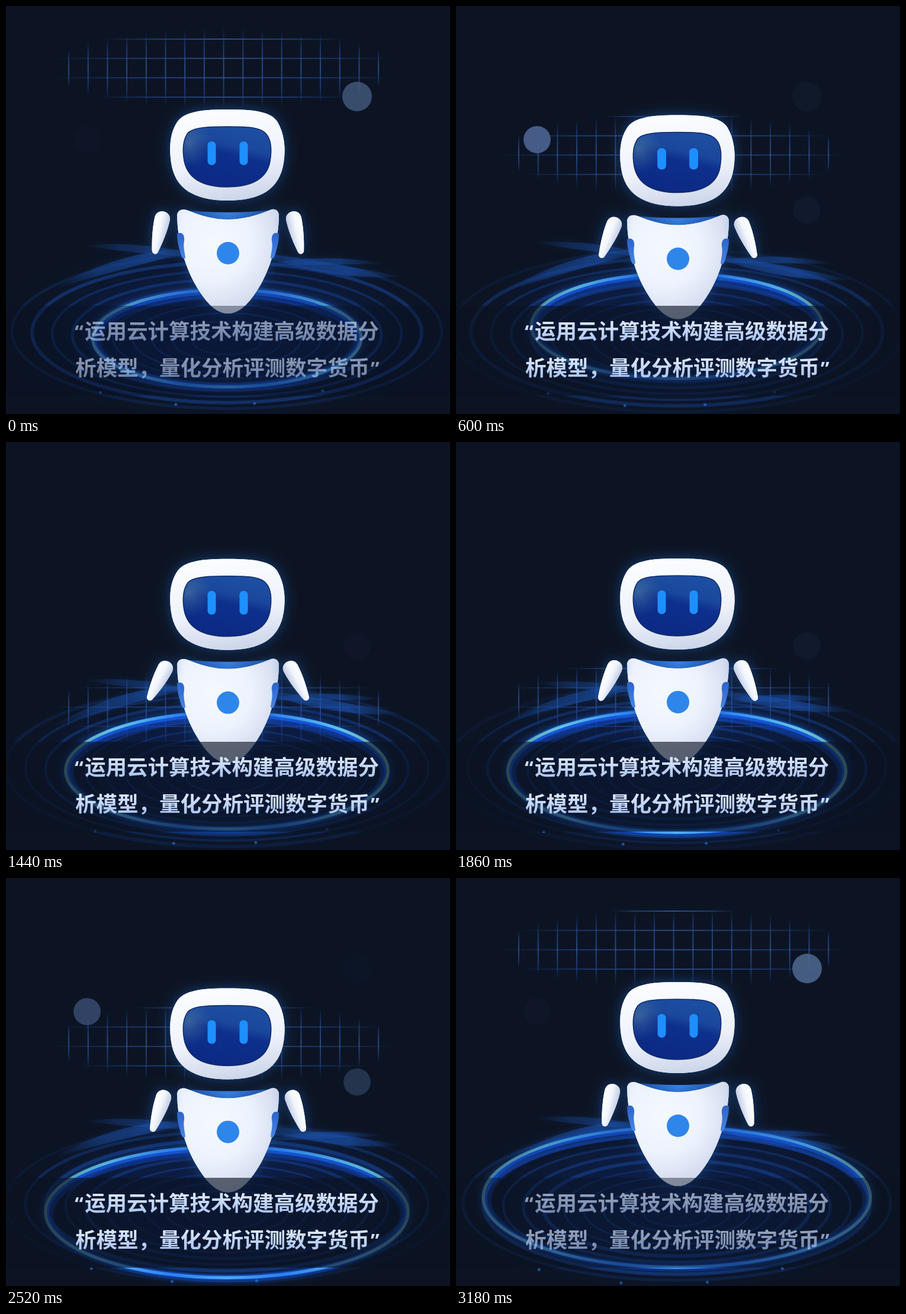
Recreate the animation shown at these times as an HTML page with a canvas. Size 750 by 690 pixels, loop 3.24 s.

```html
<!DOCTYPE html>
<html lang="zh-CN">
<head>
<meta charset="utf-8">
<style>
html, body { margin: 0; width: 100%; height: 100%; overflow: hidden; background: #0c1424; }
canvas { display: block; }
</style>
</head>
<body>
<canvas id="stage" width="750" height="690"></canvas>
<script>
const c = document.getElementById('stage').getContext('2d');
const LOOP = 3240, STEP = 60, CELL = 32.7;
const clamp = v => Math.max(0, Math.min(1, v));
const rise = (t, peak) => t < peak ? t / peak : (LOOP - t) / (LOOP - peak);

// Linear interpolation through [time, value] pairs
function track(keys, t) {
  const i = keys.findIndex(k => k[0] > t);
  const [t0, v0] = keys[i - 1], [t1, v1] = keys[i];
  return v0 + (v1 - v0) * (t - t0) / (t1 - t0);
}

function blend(grad, stops) {
  stops.forEach(([at, color]) => grad.addColorStop(at, color));
  return grad;
}
const linear = (x0, y0, x1, y1, ...stops) => blend(c.createLinearGradient(x0, y0, x1, y1), stops);
const radial = (x, y, r, ...stops) => blend(c.createRadialGradient(x, y, 0, x, y, r), stops);

function fill(path, style) {
  c.fillStyle = style;
  c.fill(path);
}

function disc(x, y, r, color) {
  c.fillStyle = color;
  c.beginPath();
  c.arc(x, y, r, 0, 7);
  c.fill();
}

function ring(cy, rx, ry, width, style) {
  c.lineWidth = width;
  c.strokeStyle = style;
  c.beginPath();
  c.ellipse(373, cy, rx, ry, 0, 0, 7);
  c.stroke();
}

// --- Scanning grid ---
function gridLine(x0, y0, x1, y1) {
  const edge = 'rgba(35,85,180,0)', mid = 'rgba(36,80,160,.6)';
  c.strokeStyle = linear(x0, y0, x1, y1, [0, edge], [.2, mid], [.5, 'rgba(58,98,168,.75)'], [.8, mid], [1, edge]);
  c.beginPath();
  c.moveTo(x0, y0);
  c.lineTo(x1, y1);
  c.stroke();
}

function grid(cy) {
  const rx = 292, ry = 69, cx = 367.5;
  c.lineWidth = 1.8;
  for (let k = 0; k < 17; k++) {
    const x = 106 + k * CELL, y = 56 + k * CELL;
    const h = ry * Math.sqrt(1 - ((x - cx) / rx) ** 2);
    gridLine(x, cy - h, x, cy + h);
    const d = (y - cy) / ry;
    if (Math.abs(d) < 1) {
      const w = rx * Math.sqrt(1 - d * d);
      gridLine(cx - w, y, cx + w, y);
    }
  }
}

function coin(x, y, r, color, scan) {
  c.globalAlpha = 1 / (1 + Math.exp((Math.abs(y - scan) - 58) / 14));
  disc(x, y, r, color);
  c.globalAlpha = 1;
}

// --- Water ---
function streak(x0, y0, x1, y1, bend, thick, alpha) {
  const mx = (x0 + x1) / 2, my = (y0 + y1) / 2 + bend;
  const rgb = a => `rgba(28,84,178,${a})`;
  c.fillStyle = linear(x0, 0, x1, 0, [0, rgb(0)], [.3, rgb(alpha * .7)], [.65, rgb(alpha)], [1, rgb(0)]);
  c.shadowColor = rgb(alpha);
  c.shadowBlur = 10;
  c.beginPath();
  c.moveTo(x0, y0);
  c.quadraticCurveTo(mx, my - thick, x1, y1);
  c.quadraticCurveTo(mx, my + thick, x0, y0);
  c.fill();
  c.shadowBlur = 0;
}

function water(t) {
  const grow = 102 * t / LOOP, sway = 6 * Math.sin(t / LOOP * 2 * Math.PI);

  c.save();
  c.translate(373, 545);
  c.scale(1, .42);
  c.fillStyle = radial(0, 0, 350, [0, 'rgba(12,44,130,.4)'], [.6, 'rgba(12,44,120,.3)'], [1, 'rgba(12,30,80,0)']);
  c.fillRect(-373, -380, 750, 760);
  c.restore();

  streak(80, 478 + sway, 330, 412, -22, 18, .5);
  streak(130, 405 - sway, 340, 425, -6, 13, .4);
  streak(410, 415, 670, 458 + sway, 12, 17, .55);
  streak(420, 440 - sway, 640, 436, -12, 11, .45);

  for (let j = -3; j < 13; j++) {
    const rx = 23 + 34 * j + grow;
    if (rx < 15 || rx > 400) continue;
    const fade = clamp((rx - 15) / 50) * clamp((400 - rx) / 70);
    const kind = (j + 3) % 3, wide = rx > 210;
    const a = fade * (wide ? .5 : .42) * (1 - kind * .15);
    ring(572 - .06 * rx, rx, rx * .36, wide ? 6 - kind : 3, `rgba(24,72,160,${a})`);
  }

  const rx = 227 + grow, ry = rx * .362;
  const cy = track([[0, 562], [600, 541], [1080, 555], [1860, 557], [2220, 554],
    [2760, 574], [3180, 540], [LOOP, 562]], t);
  c.globalAlpha = .65 + .35 * Math.sin(Math.PI * clamp(t / LOOP));
  ring(cy + 5, rx - 7, ry - 4, 13, 'rgba(16,68,200,.5)');
  ring(cy + 2, rx - 3, ry - 2, 7, 'rgba(24,92,235,.75)');
  c.shadowColor = '#1668e8';
  c.shadowBlur = 14;
  ring(cy, rx, ry, 5, linear(373 - rx, 0, 373 + rx, 0,
    [0, '#5f9fa0'], [.16, '#62c4e8'], [.35, '#2f86f5'], [.5, '#55b4f8'],
    [.65, '#2f86f5'], [.86, '#62c4e8'], [1, '#6aa69a']));
  c.shadowBlur = 0;
  c.globalAlpha = 1;

  for (let i = 0; i < 4; i++) {
    const a = 1 + i * .42, r = 300 + i * 12 + grow * .3;
    disc(373 + r * Math.cos(a), 555 + r * .38 * Math.sin(a), 2.5, 'rgba(40,120,220,.6)');
  }
}

// --- Robot ---
const headShape = new Path2D('M374 175C425 175 447 180 458 195C470 215 473 240 469 265C462 310 430 329 374 329C317 329 285 308 279 265C275 235 278 212 290 195C302 180 325 175 374 175Z');
const screenShape = new Path2D('M374 204C415 204 432 206 440 217C449 228 449 245 446 263C441 292 415 306 374 306C332 306 307 291 301 262C298 245 298 228 307 215C315 206 335 204 374 204Z');
const bodyShape = new Path2D('M289 356C288 347 296 342 305 345C330 355 350 361 375 361C400 361 425 354 446 345C455 341 462 347 461 357C460 390 452 430 432 468C415 498 397 520 375 520C353 520 335 498 318 468C298 430 290 390 289 356Z');
const neckShape = new Path2D('M298 345Q375 353 452 345Q420 366 375 366Q330 366 298 345Z');
const slotShape = new Path2D('M289 385C298 381 302 388 301 397C299 408 302 416 303 426C299 430 296 424 294 415C291 405 289 396 289 385Z');
const armShape = new Path2D('M-13 0C-13-17 13-17 13 0C13 22 8 45 5 57C3 62-3 62-5 57C-8 45-13 22-13 0Z');

function mirrored(draw) {
  for (const side of [1, -1]) {
    c.save();
    if (side < 0) {
      c.translate(750, 0);
      c.scale(-1, 1);
    }
    draw();
    c.restore();
  }
}

function glow(path) {
  c.shadowColor = 'rgba(24,78,150,.75)';
  c.shadowBlur = 20;
  fill(path, '#e8eefa');
  c.shadowBlur = 0;
}

function robot(t) {
  const swing = 17.8 * rise(t, 1134);
  const shut = Math.max(clamp(1 - Math.abs(t - 705) / 120), clamp(1 - Math.abs(t - 2190) / 120)) * .8;
  c.save();
  c.translate(0, 25.7 * rise(t, LOOP / 2));

  fill(neckShape, linear(298, 0, 452, 0, [0, '#1d4fae'], [.5, '#3c86ea'], [1, '#1d4fae']));
  glow(bodyShape);
  fill(bodyShape, radial(350, 400, 130, [0, '#f4f9ff'], [.5, '#edf3fd'], [1, '#ccd4ea']));
  mirrored(() => fill(slotShape, linear(289, 384, 302, 428, [0, '#2a62c8'], [1, '#4a86e6'])));
  disc(375, 418, 19, '#2f86ea');

  mirrored(() => {
    c.translate(264 + swing * .33, 360);
    c.rotate((12.5 + swing) * Math.PI / 180);
    glow(armShape);
    fill(armShape, linear(-13, 0, 13, 0, [0, '#ffffff'], [.5, '#f2f6fd'], [1, '#c3cce4']));
  });

  glow(headShape);
  fill(headShape, linear(350, 175, 374, 329, [0, '#fbfdff'], [.6, '#eef2fb'], [1, '#cdd6ea']));
  fill(screenShape, linear(395, 204, 370, 306, [0, '#1c4fa2'], [.32, '#1a479b'], [.48, '#0e2f8c'], [1, '#0b2a84']));
  fill(screenShape, radial(308, 232, 42, [0, 'rgba(85,130,165,.6)'], [1, 'rgba(60,105,160,0)']));
  c.strokeStyle = '#122a66';
  c.lineWidth = 1.5;
  c.stroke(screenShape);

  const w = 14 + shut * 9, h = 40 * (1 - shut);
  c.fillStyle = '#1e8fff';
  for (const x of [347.5, 401.5]) {
    c.beginPath();
    c.roundRect(x - w / 2, 249 - h / 2, w, h, Math.min(6.5, h / 3));
    c.fill();
  }
  c.restore();
}

// --- Caption ---
function caption(t) {
  c.globalAlpha = .62 + .38 * clamp(Math.min(t, LOOP - t) / 600);
  c.fillStyle = 'rgba(10,18,34,.62)';
  c.fillRect(0, 507, 750, 152);
  const line = (text, x, y) => {
    c.fillStyle = linear(0, y - 32, 0, y + 5, [0, '#dfeaff'], [1, '#a9c2ee']);
    c.fillText(text, x, y);
  };
  c.font = '700 35.5px "Noto Sans CJK SC", "Noto Sans CJK", sans-serif';
  line('运用云计算技术构建高级数据分', 133, 563);
  line('析模型，量化分析评测数字货币', 117, 625);
  c.font = '700 33px "Noto Sans", sans-serif';
  line('“', 116, 563);
  line('”', 616, 625);
  c.globalAlpha = 1;
}

function frame(now) {
  const t = Math.floor(now % LOOP / STEP) * STEP;
  const scan = 106 + 389 * rise(t, LOOP / 2);
  c.fillStyle = '#0c1424';
  c.fillRect(0, 0, 750, 690);
  grid(scan);
  coin(593, 153, 25, '#4d688e', scan);
  coin(137, 226, 23, '#4c628f', scan);
  coin(593, 345, 23, '#4d6c94', scan);
  water(t);
  robot(t);
  caption(t);
}

let start;
function tick(now) {
  start ??= now;
  frame(now - start);
  requestAnimationFrame(tick);
}
frame(0);
requestAnimationFrame(tick);
</script>
</body>
</html>
```
